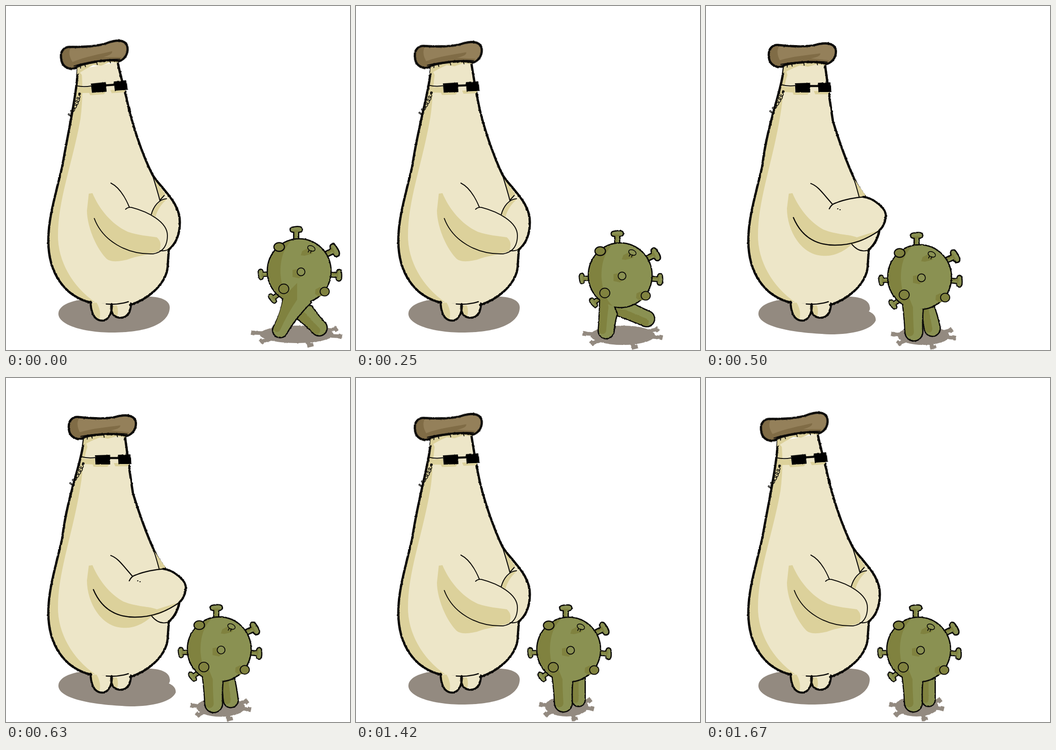
Animation, 748 px wide and 748 px high, one loop 2.29 s. Source, as an HTML page:

```html
<!DOCTYPE html>
<html lang="en">
<head>
<meta charset="utf-8">
<title>Bouncer</title>
<style>
  html, body { margin: 0; width: 100%; height: 100%; overflow: hidden; background: #fff; }
  svg { display: block; width: 100vw; height: 100vh; }
  path, ellipse, circle { stroke-linecap: round; stroke-linejoin: round; }
</style>
</head>
<body>
<svg viewBox="0 0 748 748">
  <filter id="rough" filterUnits="userSpaceOnUse" x="-748" y="-748" width="1496" height="1496" color-interpolation-filters="sRGB">
    <feTurbulence type="fractalNoise" baseFrequency=".22" numOctaves="2" seed="4"/>
    <feDisplacementMap in="SourceGraphic" scale="2.6" xChannelSelector="R" yChannelSelector="G"/>
  </filter>
  <g id="scene"></g>
</svg>
<script>
const INK = '#0b0a08', CREAM = '#ede6c8', SAND = '#dcd19b', CAP = '#94805a', CAP_DARK = '#806c46';
const GREEN = '#8a9152', MOSS = '#80823f', SHADOW = '#938a80';

const fill = (d, color) => `<path d="${d}" fill="${color}"/>`;
const line = (d, width = 2) => `<path d="${d}" fill="none" stroke="${INK}" stroke-width="${width}"/>`;
const rough = content => `<g filter="url(#rough)">${content}</g>`;
const oval = (x, y, rx, ry, color, width = 0, turn = 0) =>
  `<ellipse cx="${x}" cy="${y}" rx="${rx}" ry="${ry}" fill="${color}" stroke="${INK}" stroke-width="${width}" transform="rotate(${turn} ${x} ${y})"/>`;
const mix = (a, b, t) => a.map((v, i) => v + (b[i] - v) * t);

// ---------- mushroom; lean runs from 0 (upright) to 2 (towards the visitor) ----------

function earpiece(lean) {
  const [x0, y0, x1, y1, x2, y2] = mix([160, 191, 156, 213, 136, 240], [168, 186, 161, 207, 139, 233], lean / 2);
  let d = '';
  for (let i = 0; i <= 70; i++) {
    const t = i / 70, s = 1 - t, a = t * 44, r = 3.6 * Math.min(1, t * 5);
    const x = s * s * x0 + 2 * s * t * x1 + t * t * x2 + r * Math.cos(a);
    const y = s * s * y0 + 2 * s * t * y1 + t * t * y2 + r * Math.sin(a);
    d += `${i ? 'L' : 'M'}${x.toFixed(1)},${y.toFixed(1)}`;
  }
  return line(d, 1.5) + oval(x0, y0, 2.8, 2.8, INK);
}

function cap(lean) {
  const shape = 'M137,108C136,92 146,83 160,85C195,89 225,89 245,83C268,78 283,84 283,99C283,113 274,123 263,126C245,120 205,121 175,127C165,132 160,134 154,132C142,128 137,119 137,108Z';
  return `<g transform="translate(${8.5 * (lean - 2) - .5} ${lean / 2 - 1}) rotate(${-2.8 * (2 - lean)} 210 108)">` +
    fill('M171,125L259,121L260,129L240,127L222,132L205,129L188,136L168,146Z', SAND) +
    fill(shape, CAP) +
    fill('M160,86C154,96 155,106 161,118C190,109 220,107 249,103C250,109 240,112 228,114L268,118L263,125C245,120 205,121 175,127C165,132 160,134 154,132C142,128 137,119 137,108C136,92 146,83 160,86Z', CAP_DARK) +
    rough(line(shape, 4.8)) +
    line('M163,127C185,122 235,118 264,122M178,126L177,133M187,125L188,131M213,123L214,129M241,121L243,128M250,121L252,126', 1.8) + '</g>';
}

function glasses(lean) {
  return `<g transform="translate(${224 + 4.25 * lean} ${175 + lean}) rotate(${-2 * (2 - lean)})">` +
    fill('M-66,-1L-39,-2V10H-7L-12,16H-42L-44,11L-62,10ZM2,8H12V10H36L32,15H5Z', SAND) +
    line('M-69,-6Q-55,-2 -38,-4', 2) + line('M-7,-3H12', 4.5) +
    rough(fill('M-39,-9L-6,-10L-6,11L-38,11ZM11,-10L39,-11L40,10L12,10Z', '#000')) + '</g>';
}

function armsFolded() {
  return fill('M180,408L188,407C202,440 228,474 265,491C288,499 310,500 328,503Q341,514 333,533C310,541 285,543 262,552C238,557 226,556 218,549C193,523 176,475 176,445Z', SAND) +
    fill('M322,376L347,410L336,421Z', SAND) +
    fill('M316,453C322,436 336,420 350,420C338,430 328,445 325,459Z', SAND) +
    line('M228,385C246,394 258,413 268,437M260,442C264,438 268,437 273,438C308,447 351,469 351,499C351,520 343,535 320,539C262,541 210,510 192,462') +
    line('M318,366C324,385 330,405 335,424M316,453C321,435 333,420 349,419M335,422L344,412M335,532Q348,534 356,527', 2.2);
}

function armsPointing() {
  const hand = 'M342,415C362,417 391,438 391,456C390,470 386,480 377,488';
  return fill('M322,376L347,412L332,418Z', SAND) +
    fill(hand + 'L300,500V425Z', CREAM) +
    fill('M180,408L188,407C202,440 226,470 255,486C285,498 310,496 328,503L372,489C355,505 335,514 316,519C306,529 285,542 265,543C243,545 225,538 210,524C188,503 176,470 176,440Z', SAND) +
    line('M228,386C244,392 252,405 275,431M268,441C272,433 276,430 283,428C300,421 325,416 345,415M377,488C350,507 320,520 280,520C235,520 206,498 190,460', 2.4) +
    line('M318,366C325,385 329,400 333,415M317,518C327,530 340,536 355,530M286,441H287M291,443H292') +
    rough(line(hand, 4.5));
}

function mushroom(lean) {
  const pointing = lean === 2;
  const left = `${156 + 7 * lean},${138 - 5 * lean}C${154 + 5 * lean},190 ${138 - 2 * lean},${260 - 5 * lean} 122,350C108,410 92,460 92,510C92,583 129,632 185,645`;
  const side = pointing
    ? 'C365,521 374,505 377,488L377,450L345,413C335,400 325,385 318,366'
    : 'C371,515 378,496 378,470C378,438 357,415 342,397C332,385 324,377 318,366';
  const right = `270,650C315,635 352,600 352,560L354,530${side}C${294 + 3 * lean},${318 + 3.5 * lean} ${272 + 5.5 * lean},${250 + 12 * lean} ${262 + 7 * lean},${200 + 25 * lean}C${252 + 9 * lean},${160 + 27 * lean} ${247 + 8.5 * lean},${145 + 10 * lean} ${243 + 7.5 * lean},122`;
  const feet = 'M184,643C184,660 189,684 209,684C223,684 231,668 230,649M229,650C227,670 236,678 250,678C265,677 271,664 272,647';
  return fill(`M${left}L${right}Z`, CREAM) +
    fill(`M${left}L203,650C150,618 113,560 113,500C113,420 144,345 162,${245 - 5 * lean}C166,215 167,180 ${165 + 6 * lean},150Z`, SAND) +
    fill(feet, CREAM) +
    fill('M186,646C186,660 190,677 203,681Q208,664 197,645ZM230,652C228,668 234,675 241,675Q246,665 241,651Z', SAND) +
    rough(line(`M${left}M${right}`, 5) + line(feet, 4.4)) +
    (pointing ? armsPointing() : armsFolded()) +
    line('M218,648Q245,650 266,643', 2.4) +
    glasses(lean) + earpiece(lean) + cap(lean);
}

function mushroomShadow(lean) {
  const edge = lean === 2
    ? 'C356,652 358,660 354,664C363,668 370,674 369,684C360,704 320,714 270,714'
    : 'C356,685 320,710 230,710';
  return fill(`M114,668C116,645 160,634 215,636C260,638 275,632 310,632C340,632 356,642 356,655${edge}C165,710 112,692 114,668Z`, SHADOW);
}

// ---------- virus ----------
// Legs: outer hip, inner hip, foot centre, foot radius. Shadow: centre, radii.

const walk = [
  { at: [175, -14], front: [604, 632, 662, 645, 596, 705, 15], back: [635, 680, 664, 653, 681, 700, 16], shade: [632, 714, 80, 19] },
  { at: [112, -5], front: [531, 640, 567, 670, 544, 706, 16], back: [568, 672, 606, 650, 632, 680, 16], shade: [580, 716, 70, 21] },
  { at: [57, -1], front: [484, 652, 514, 676, 490, 709, 16], back: [513, 680, 541, 658, 544, 699, 16], shade: [520, 717, 64, 20] },
  { at: [2, -1], front: [429, 650, 471, 660, 452, 709, 18], back: [472, 662, 495, 653, 492, 701, 16], shade: [473, 717, 56, 20] },
  { at: [0, 0], front: [428, 650, 470, 660, 451, 707, 18], back: [471, 662, 497, 653, 484, 700, 13], shade: [458, 714, 47, 22] },
];

function walkPose(step) {
  const a = walk[Math.floor(step)], b = walk[Math.ceil(step)], pose = {};
  for (const key in a) pose[key] = mix(a[key], b[key], step % 1);
  return pose;
}

function legShape([ax, ay, bx, by, fx, fy, r]) {
  const mx = (ax + bx) / 2, my = (ay + by) / 2, dx = fx - mx, dy = fy - my, len = Math.hypot(dx, dy);
  const px = dy / len * r, py = -dx / len * r;
  return `M${ax},${ay}Q${fx - px - dx / 2},${fy - py - dy / 2} ${fx - px},${fy - py}` +
    `A${r},${r} 0 0 0 ${fx + px},${fy + py}Q${fx + px - dx / 2},${fy + py - dy / 2} ${bx},${by}` +
    `L${mx - dx / 2},${my - dy / 2}Z`;
}

function legShade([ax, ay, bx, by, fx, fy, r]) {
  const dx = fx - (ax + bx) / 2, dy = fy - (ay + by) / 2, k = r / 2 / Math.hypot(dx, dy);
  return fill(legShape([ax, ay, (ax + bx) / 2, (ay + by) / 2, fx - dy * k, fy + dx * k, r / 2]), MOSS);
}

const outlined = d => `<path d="${d}" fill="${GREEN}" stroke="${INK}" stroke-width="5.6" paint-order="stroke"/>`;

const spike = (x, y, turn, size = 1) => `<g transform="translate(${x} ${y}) rotate(${turn}) scale(${size})">` +
  outlined('M-4,6V-17H4V6ZM-11,-18C-14,-25 -8,-25 0,-26C10,-27 14,-24 11,-18C8,-15 -8,-15 -11,-18Z') +
  fill('M-4,6V-16L-10,-18Q-4,-21 9,-18L0,-15V6Z', MOSS) + '</g>';

function virus({ at: [x, y], front, back }) {
  const place = content => `<g transform="translate(${x} ${y})">${content}</g>`;
  const cx = 462.5 + x, cy = 590.5 + y;
  const body = `M${cx - 68},${cy}A68,69 0 0 0 ${cx + 68},${cy}A68,69 0 0 0 ${cx - 68},${cy}Z`;
  const spikes = spike(456, 521, 0) + spike(519, 555, 64, 1.1) + spike(529, 598, 94, .95) +
    spike(397, 597, -92, .85) + spike(419, 640, -125, .85);
  return rough(outlined(legShape(back)) + legShade(back) + place(spikes) + outlined(body + legShape(front))) +
    legShade(front) +
    place(
      fill('M446,524C424,545 421,575 422,598C424,625 432,645 446,657C420,650 396,625 395,590C396,555 420,530 446,524Z', MOSS) +
      fill('M469,547L482,540L495,545L490,553L474,557L466,556ZM448,588L459,586L470,600L462,606L448,603ZM498,630L508,625L518,644L504,645L497,640Z', MOSS) +
      oval(419, 538, 11.5, 9.5, MOSS, 2.4) +
      oval(466.5, 592, 8.5, 8.5, GREEN, 1.9) +
      oval(429, 629, 11, 10.5, MOSS, 1.9) +
      oval(518, 635, 10, 9.5, MOSS, 2) +
      oval(489, 541, 8.5, 5.5, GREEN, 1.7, 25) +
      line('M484,545L482,549M489,546L487,551', 1.7));
}

function virusShadow([x, y, rx, ry]) {
  let d = '';
  for (const degrees of [188, 142, 72, 10, -28]) {
    const a = degrees * Math.PI / 180, c = Math.cos(a), s = Math.sin(a);
    const tx = x + c * rx * 1.2, ty = y + s * ry * 1.3;
    d += `M${x + c * rx * .9},${y + s * ry * .9}L${tx},${ty}M${tx - s * 7},${ty + c * 5}L${tx + s * 7},${ty - c * 5}`;
  }
  return rough(oval(x, y, rx, ry, SHADOW) + `<path d="${d}" stroke="${SHADOW}" stroke-width="8" style="stroke-linecap:butt"/>`);
}

// ---------- timeline: start in ms, lean, walk step ----------

const LOOP = 2290;
const timeline = [
  [0, 0, 0], [130, .5, .5], [250, 1, 1], [380, 2, 2], [500, 2, 3],
  [630, 2, 3.4], [750, 2, 4], [1420, 1, 4], [1580, .5, 4], [1670, 0, 4],
];
const scene = document.getElementById('scene');
let shown;

function draw() {
  const time = performance.now() % LOOP;
  const current = timeline.findLast(([start]) => start <= time);
  if (current !== shown) {
    shown = current;
    const [, lean, step] = current, pose = walkPose(step);
    scene.innerHTML = mushroomShadow(lean) + virusShadow(pose.shade) + mushroom(lean) + virus(pose);
  }
  requestAnimationFrame(draw);
}
draw();
</script>
</body>
</html>
```
